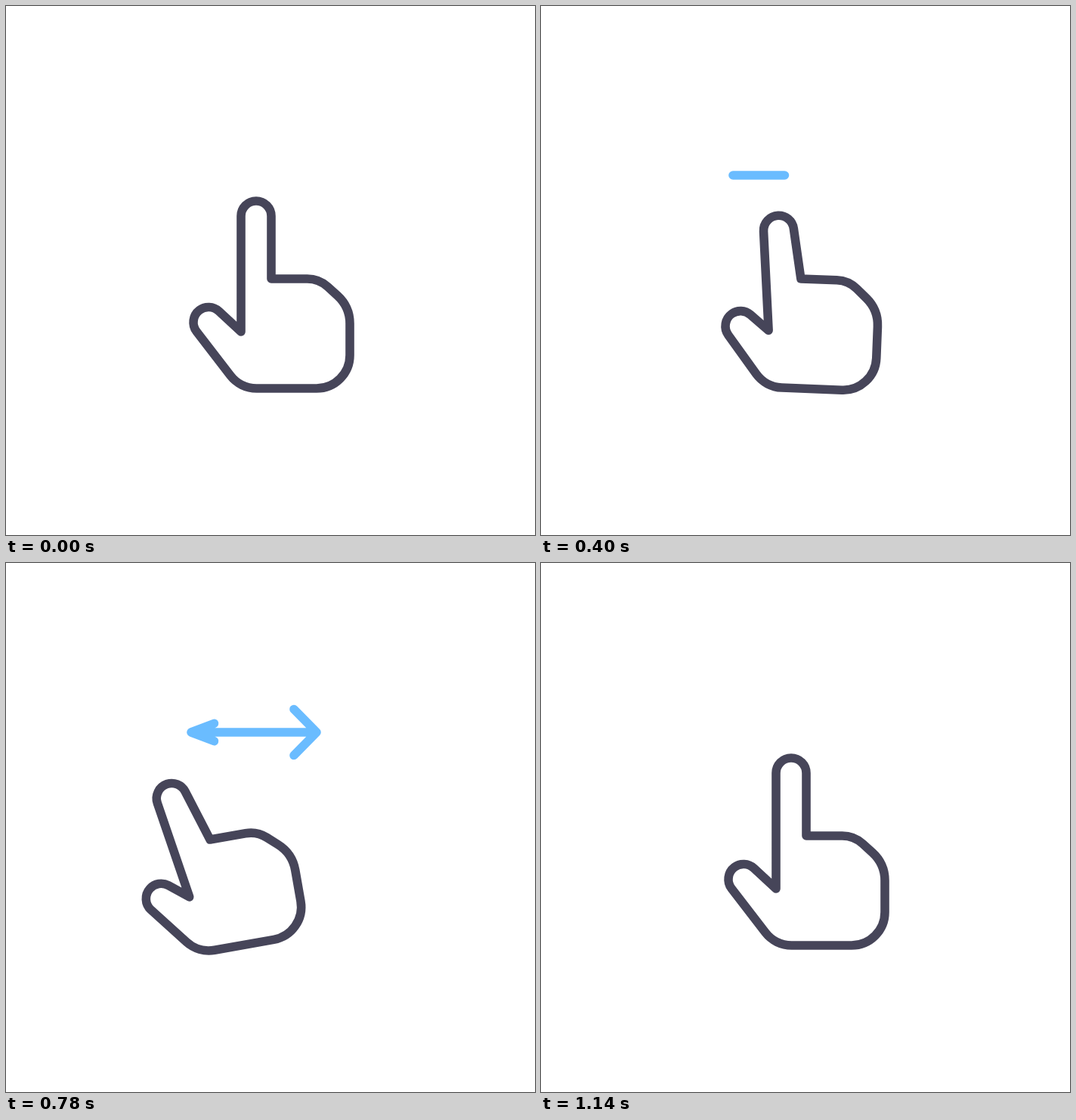
Animation of 700x700 px, one loop 1200 ms. Source, as an HTML page with a canvas:

```html
<!DOCTYPE html>
<html lang="en">
<head>
<meta charset="utf-8">
<title>Swipe gesture</title>
<style>
  html, body { margin: 0; width: 100%; height: 100%; overflow: hidden; background: #fff; }
  canvas { display: block; width: 700px; height: 700px; }
</style>
</head>
<body>
<canvas id="stage" width="700" height="700"></canvas>
<script>
const ctx = document.getElementById('stage').getContext('2d');
const LOOP = 1200, STEP = 20;
const DARK = '#464559', BLUE = '#6abcff';
const ARROW_Y = 224, HEAD_OPEN = 30.5, HEAD_TIME = 112;

const part = (t, from, to) => Math.min(1, Math.max(0, (t - from) / (to - from)));
const ease = (t, from, to) => {
  const u = part(t, from, to);
  return u * u * (3 - 2 * u);
};
const hop = (t, from, to) => Math.sin(Math.PI * part(t, from, to));

// The hand moves out to the left, swipes right and back, then returns to rest
function pose(t) {
  const out = ease(t, 100, 310) - ease(t, 780, 1050);
  const swipe = ease(t, 300, 520) - ease(t, 540, 780);
  const tiltOut = ease(t, 170, 340) - ease(t, 780, 960);
  const tiltSwipe = ease(t, 310, 465) - ease(t, 540, 780);
  const lift = 6.5 * (hop(t, 100, 310) + hop(t, 780, 1050))
             + 2.5 * (hop(t, 300, 520) + hop(t, 540, 780));
  return {
    x: 351 - 81 * out + 171 * swipe,
    y: 361 + 5 * out - 6 * swipe - lift,
    tilt: (-10 * tiltOut + 19.8 * tiltSwipe) * Math.PI / 180,
    press: ease(t, 215, 320) - ease(t, 800, 1140),
    lean: -20.5 + 20 * swipe
  };
}

// Angle where a line from (px, py) touches a circle
function touch(px, py, cx, cy, r, side) {
  const dx = px - cx, dy = py - cy;
  return Math.atan2(dy, dx) + side * Math.acos(r / Math.hypot(dx, dy));
}

function drawHand(t) {
  const { x, y, tilt, press, lean } = pose(t);
  const r = 20;
  const fx = -20 + lean * press, fy = -83 + 20.5 * press;    // fingertip
  const tx = -83 + 5.7 * press, ty = 57.5 + 8.3 * press;     // thumb tip
  const nx = -40, ny = 70;                                   // notch
  const right = 104, bottom = 145, heel = -41;

  ctx.save();
  ctx.translate(x, y);
  ctx.rotate(tilt);
  ctx.beginPath();
  ctx.moveTo(nx, ny);
  ctx.arc(fx, fy, r, touch(nx, ny, fx, fy, r, 1), touch(0, 0, fx, fy, r, -1));
  ctx.lineTo(0, 0);
  ctx.arcTo(63, 0, right, 37, 40);
  ctx.arcTo(right, 37, right, bottom, 50);
  ctx.arcTo(right, bottom, heel, bottom, 44);
  const low = touch(heel, bottom, tx, ty, r, 1);
  ctx.arcTo(heel, bottom, tx + r * Math.cos(low), ty + r * Math.sin(low), 44);
  ctx.arc(tx, ty, r, low, touch(nx, ny, tx, ty, r, -1));
  ctx.closePath();
  ctx.strokeStyle = DARK;
  ctx.stroke();
  ctx.restore();
}

function addHead(tip, back, t, start) {
  if (t <= start) return;
  const open = HEAD_OPEN * ease(t, start, start + HEAD_TIME);
  ctx.moveTo(back, ARROW_Y - open);
  ctx.lineTo(tip, ARROW_Y);
  ctx.lineTo(back, ARROW_Y + open);
}

function drawArrow(t) {
  const length = 157 * ease(t, 320, 495);
  if (length === 0) return;
  ctx.globalAlpha = 1 - ease(t, 1020, 1140);
  ctx.strokeStyle = BLUE;
  ctx.beginPath();
  ctx.moveTo(254, ARROW_Y);
  ctx.lineTo(254 + length, ARROW_Y);
  addHead(411, 381, t, 470);
  addHead(245, 275.5, t, 733);
  ctx.stroke();
  ctx.globalAlpha = 1;
}

function draw(now) {
  const t = Math.floor((now % LOOP) / STEP) * STEP;
  ctx.fillStyle = '#fff';
  ctx.fillRect(0, 0, 700, 700);
  ctx.lineWidth = 11.6;
  ctx.lineCap = ctx.lineJoin = 'round';
  drawArrow(t);
  drawHand(t);
}

let start = null;
function tick(now) {
  if (start === null) start = now;
  draw(now - start);
  requestAnimationFrame(tick);
}
draw(0);
requestAnimationFrame(tick);
</script>
</body>
</html>
```
